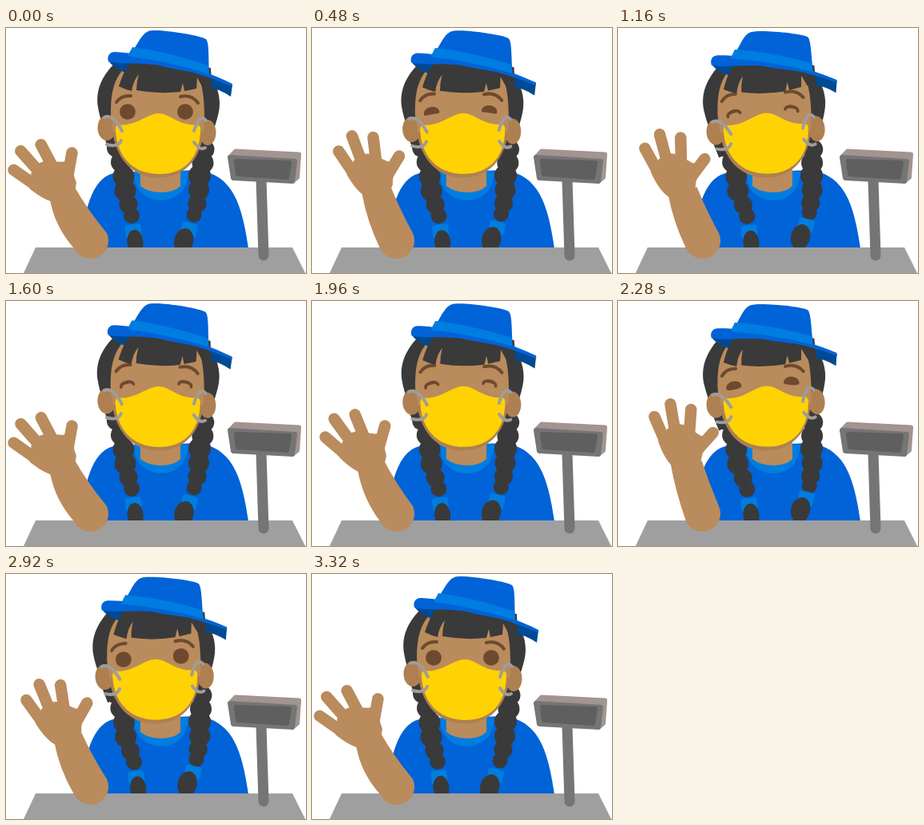
An HTML page that plays this animation: 375 px wide and 307 px high, repeating every 3360 ms.

```html
<!DOCTYPE html>
<html lang="en">
<head>
<meta charset="utf-8">
<title>Waving cashier</title>
<style>
  html, body { margin: 0; width: 100%; height: 100%; overflow: hidden; background: #fff; }
  svg { display: block; width: 375px; height: 307px; }
  .blue { fill: #0063d7; }
  .light { fill: #007de0; }
  .under { fill: #004a94; }
  .hair { fill: #3a3a3a; }
  .skin { fill: #ba8b5c; }
  .shade { fill: #ae8051; }
  .line { fill: none; stroke-linecap: round; stroke-linejoin: round; }
  .brow { stroke: #6d4a2f; stroke-width: 4; }
  .eye { fill: #6d4a2f; stroke: #6d4a2f; stroke-width: 3.6; stroke-linecap: round; stroke-linejoin: round; }
  .strap { stroke: #a09c9a; stroke-width: 4; }
  .finger { stroke: #ba8b5c; stroke-width: 14.5; }
</style>
</head>
<body>
<svg viewBox="0 0 375 307">
  <!-- body -->
  <path class="blue" d="M90 276C100 228 106 190 134 182L240 178C283 184 295 220 303 276Z"/>
  <path class="light" d="M159 180C160 203 175 216 194 216C213 216 227 203 228 180Z"/>
  <path class="skin" d="M168 165V198Q178 206 194 206Q210 206 218 198V165Z"/>

  <g id="braids"></g>

  <!-- head, back to front -->
  <path class="hair" data-part="hair" d="M136 44C118 62 112 80 115 99C117 112 121 120 124 140L130 158L150 150V60H236V150L254 150C257 130 267 112 267 95C267 82 263 70 254 60Z"/>
  <g data-part="ears" class="shade">
    <ellipse cx="126" cy="125" rx="11.5" ry="16"/>
    <ellipse cx="252" cy="131" rx="10.5" ry="16"/>
  </g>
  <g data-part="face">
    <path class="shade" d="M131 105C131 160 155 187.500 191 187.500C226 187.500 248 160 248 115Z"/>
    <path class="skin" d="M150 48C136 62 131 78 131 105L134 130H247L248 115C248 88 246 72 239 56Z"/>
  </g>
  <g data-part="eyes">
    <path id="browL" class="line brow" d="M138 93Q144 84 156 85"/>
    <path id="browR" class="line brow" d="M218 86Q232 83 240 94"/>
    <path id="eyeL" class="eye"/>
    <path id="eyeR" class="eye"/>
  </g>
  <g data-part="hair">
    <path class="under" d="M128 41Q134 50 149 56L165 40ZM245 55L255 75Q266 76 281 86L283 71Z"/>
    <path class="hair" d="M160 38Q149 48 141 73Q149 77 157 79Q159 66 166 58Q163 68 163 78Q190 83 218 80L221 69L223 79L238 76L239 62L246 75L257 74L256 50Z"/>
    <path class="blue" d="M128 42C126 36 129 30 136 30C175 32 235 46 283 70V74C262 64 228 52 195 47C165 43 145 46 128 42Z"/>
    <path class="blue" d="M153 36C163 25 168 8 178 4C187 0 243 9 250 14C254 18 253 35 254 58Q205 53 153 36Z"/>
    <path class="light" d="M158 24Q200 29 253 47L254 58Q205 42 152 35Z"/>
  </g>
  <path data-part="mask" fill="#ffd204" d="M137 128C137 118 142 123 151 121C166 119 179 107 191 107C203 107 213 119 230 121C239 122 243 120 243 127C243 160 225 183 192 183C156 183 138 158 137 128Z"/>
  <g data-part="ears" class="line strap">
    <path d="M123 112Q134 107 145 129M126 146Q140 150 144 141"/>
    <path d="M235 129Q242 106 250 116M235 143Q242 154 249 150"/>
  </g>

  <!-- counter and till display -->
  <path fill="#9f9f9f" d="M37 275H358L374 307H22Z"/>
  <path class="line" stroke="#757575" stroke-width="13" d="M319 190L322 285"/>
  <g stroke-linejoin="round" stroke-width="6">
    <path fill="#a2948f" stroke="#a2948f" d="M287 154.500L366 158.500L364 187L358 192L281 161Z"/>
    <path fill="#757575" stroke="#757575" d="M280 162L361 167L358 192L284 188Z"/>
    <path fill="#5f5f5f" stroke="#5f5f5f" d="M288 167L354 169L351 187L290 183Z"/>
  </g>

  <!-- waving arm -->
  <path id="forearm" class="skin"/>
  <g id="hand">
    <path class="skin" d="M50 174L58 168L62 159L78 154L83 155L99 166L103 169L118 174L108 186Q104 193 103 200L95 209H70Q58 200 50 174Z"/>
    <path class="line finger" d="M46.500 143.500L60 178M67 128.500L72 165M92.500 136L89 170M119 166L98 188"/>
  </g>
</svg>
<script>
const LOOP = 3360, STEP = 40, WAVE = LOOP / 2;
const $ = id => document.getElementById(id);
const ease = x => (1 - Math.cos(Math.PI * x)) / 2;
const lerp = (a, b, k) => a + (b - a) * k;

// [time, value] rows, eased in between
const TILT = [[0, 0], [200, 0], [980, 1], [1690, 0], [2480, 1], [2620, 1], [3330, 0], [LOOP, 0]];
const SMILE = [[0, 0], [370, 0], [550, 1], [2200, 1], [2380, 0], [LOOP, 0]];

function track(keys, t) {
  const i = keys.findIndex(k => k[0] > t);
  const [t0, a] = keys[i - 1], [t1, b] = keys[i];
  return lerp(a, b, ease((t - t0) / (t1 - t0)));
}

// pivot x, y, then shift and turn at full tilt
const PARTS = {
  hair: [190, 90, -9.5, 1, -4.2],
  ears: [189, 128, -4.6, 0.5, -5.6],
  face: [190, 130, -7, 0, -1.5],
  eyes: [188, 104, -8.5, 0, -5.4],
  mask: [190, 130, -6, -0.5, -1.2]
};
const parts = [...document.querySelectorAll('[data-part]')];

// x, y, radius, then shift at full tilt
const BRAIDS = [
  { knots: [[138, 150, 12, -3, 0], [144, 168, 13, -1, 0], [147, 186, 13.5, 1, 0], [149, 204, 13.5, 1, 0],
            [153, 221, 11.5, 4, 1], [157, 235, 10, 5, 1]],
    end: [159, 254, 6, 1], turn: -6, tail: [1, 14, 10, 15] },
  { knots: [[248, 152, 12.5, -5, 0], [246, 169, 13.5, -4, 0], [242, 185, 14, 0, 0], [241, 203, 13, 2, 0],
            [239, 220, 11.5, 2, -1], [235, 234, 9.5, 5, -3]],
    end: [229, 252, 7, -6], turn: 14, tail: [-3, 16, 12, 16] }
];

function add(parent, tag, attrs) {
  const el = document.createElementNS('http://www.w3.org/2000/svg', tag);
  for (const k in attrs) el.setAttribute(k, attrs[k]);
  return parent.appendChild(el);
}

for (const b of BRAIDS) {
  b.dots = b.knots.map(([, , r]) => add($('braids'), 'circle', { class: 'hair', r }));
  b.tip = add($('braids'), 'g', {});
  const [cx, cy, rx, ry] = b.tail;
  add(b.tip, 'rect', { class: 'light', x: -10, y: -8, width: 20, height: 17, rx: 3 });
  add(b.tip, 'ellipse', { class: 'hair', cx, cy, rx, ry });
}

function drawHead(h, smile) {
  for (const el of parts) {
    const [x, y, dx, dy, turn] = PARTS[el.dataset.part];
    el.setAttribute('transform', `translate(${dx * h} ${dy * h}) rotate(${turn * h} ${x} ${y})`);
  }
  for (const b of BRAIDS) {
    b.knots.forEach(([x, y, , dx, dy], i) => {
      b.dots[i].setAttribute('cx', x + dx * h);
      b.dots[i].setAttribute('cy', y + dy * h);
    });
    const [x, y, dx, dy] = b.end;
    b.tip.setAttribute('transform', `translate(${x + dx * h} ${y + dy * h}) rotate(${b.turn})`);
  }
  const top = lerp(-10.5, -6.5, smile), low = lerp(10.5, -5.5, smile);
  const shape = `M-8 0C-8 ${top} 8 ${top} 8 0C8 ${low} -8 ${low} -8 0Z`;
  [['L', 152, -1, 5], ['R', 224, 1, 3]].forEach(([side, x, dir, lift]) => {
    $('eye' + side).setAttribute('d', shape);
    $('eye' + side).setAttribute('transform', `translate(${x} ${105 + smile}) rotate(${14 * dir * smile})`);
    $('brow' + side).setAttribute('transform', `translate(0 ${-lift * smile})`);
  });
}

function swing(t) {
  return 47 * Math.pow((1 - Math.cos(2 * Math.PI * (t + 20) / WAVE)) / 2, 1.4);
}

// the hand's turn lags a little behind its travel
function drawArm(t) {
  const d = swing(t), k = d / 37.5;
  const x = 45.5 + d, y = 166 - 0.5 * d + 0.0045 * d * d;
  const turn = 0.93 * swing(t - 30) - 33.7;
  $('hand').setAttribute('transform', `translate(${x} ${y}) rotate(${turn}) translate(-83 -153.5)`);
  const lx = lerp(55, 66, k), ly = lerp(215, 204, k);
  const rx = lerp(85, 105, k), ry = lerp(198, 200, k);
  $('forearm').setAttribute('d',
    `M${lx} ${ly}Q${lx + 6} ${ly + 34} 85 276A22.5 22.5 0 0 0 126 257` +
    `Q${lerp(102, 114, k)} 228 ${rx} ${ry}Z`);
}

function draw(now) {
  const t = Math.floor(now % LOOP / STEP) * STEP;
  drawHead(track(TILT, t), track(SMILE, t));
  drawArm(t);
}

const start = performance.now();
function tick() {
  draw(performance.now() - start);
  requestAnimationFrame(tick);
}
tick();
</script>
</body>
</html>
```
